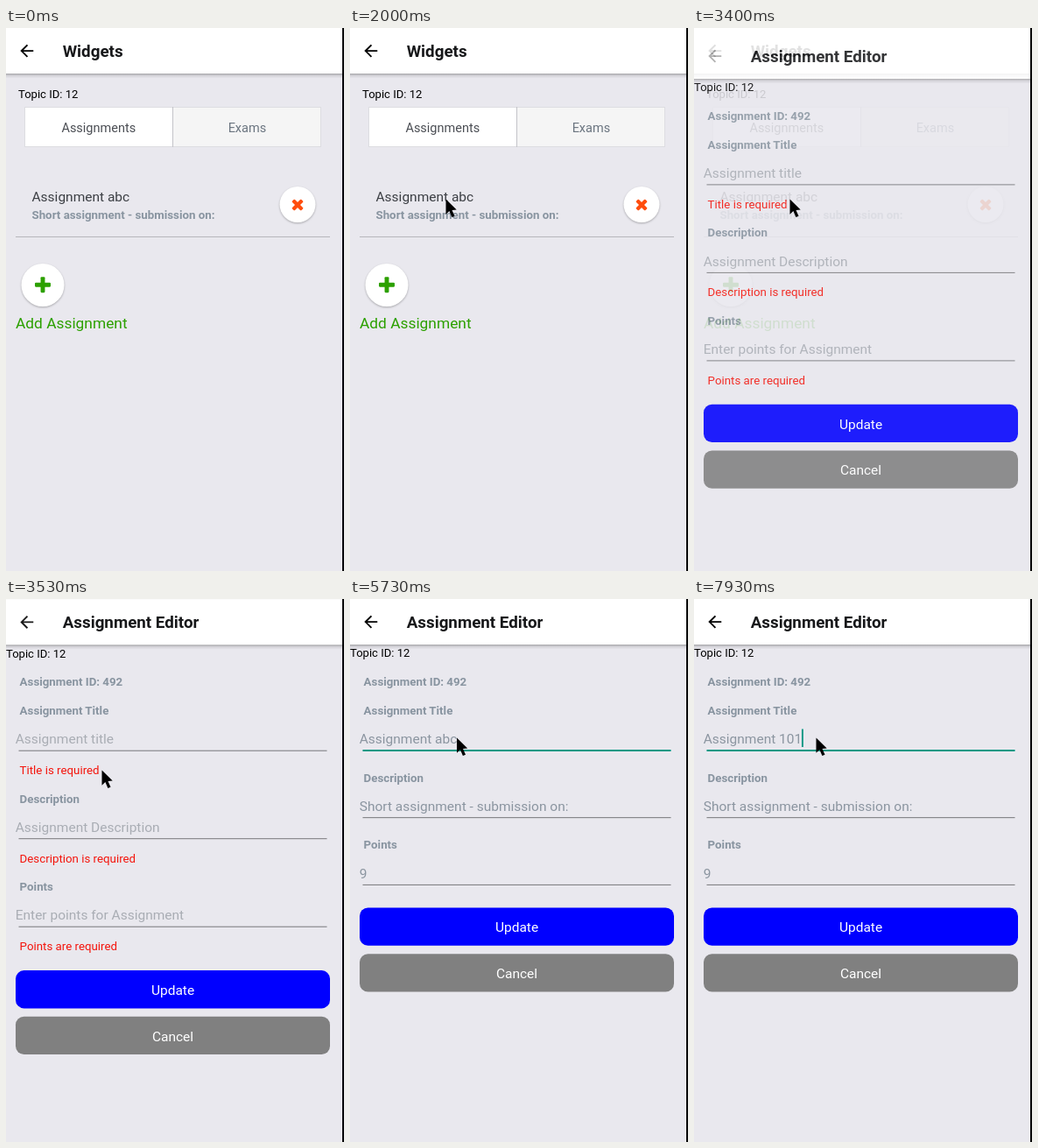
An HTML page for the animation above (8 s loop, 386 by 620 pixels).

```html
<!DOCTYPE html>
<html lang="en">
<head>
<meta charset="utf-8">
<title>Assignment editor</title>
<style>
html, body { margin: 0; width: 100%; height: 100%; overflow: hidden; background: #e9e8ee; }
svg { display: block; width: 386px; height: 620px; }
text { font-family: Roboto, "Noto Sans", sans-serif; white-space: pre; }
.raised { filter: drop-shadow(0 1px 1.3px rgba(0, 0, 0, .28)); }
</style>
</head>
<body>
<svg viewBox="0 0 386 620" xmlns="http://www.w3.org/2000/svg">
  <defs>
    <linearGradient id="shade" x1="0" y1="0" x2="0" y2="1">
      <stop offset="0" stop-color="#000" stop-opacity=".32"/>
      <stop offset=".4" stop-color="#000" stop-opacity=".1"/>
      <stop offset="1" stop-color="#000" stop-opacity="0"/>
    </linearGradient>
  </defs>
  <g id="list"></g>
  <g id="editor"></g>
  <rect x="384" width="2" height="620"/>
  <path id="cursor" d="M0 0V17.2L3.9 13.6 6.9 20.6 10 19.2 7 12.4 12.2 12Z"/>
</svg>
<script>
const LOOP = 8000, TICKS_PER_MS = 0.015;
const BG = '#e9e8ee', MUTED = '#8894a0', TEAL = '#009884';
const FIELD_SIZE = 15.5, FIELD_X = 10.7;
const $ = id => document.getElementById(id);
const measure = document.createElement('canvas').getContext('2d');

// y is the middle of the text line
const text = (s, x, y, size, fill, weight = 400, anchor = 'start') =>
  `<text x="${x}" y="${y + size * 0.342}" font-size="${size}" fill="${fill}" font-weight="${weight}" text-anchor="${anchor}">${s}</text>`;
const rect = (x, y, w, h, fill, extra = '') =>
  `<rect x="${x}" y="${y}" width="${w}" height="${h}" fill="${fill}" ${extra}/>`;
const circle = (x, y, r) => `<circle class="raised" cx="${x}" cy="${y}" r="${r}" fill="#fff"/>`;
const cross = (x, y, arm, width, fill, turn) =>
  `<g transform="translate(${x} ${y}) rotate(${turn})">` +
  rect(-arm, -width / 2, arm * 2, width, fill, 'rx="1.1"') +
  rect(-width / 2, -arm, width, arm * 2, fill, 'rx="1.1"') + '</g>';

function header(title, arrowAlpha = 1) {
  return rect(0, 0, 384, 52.3, '#fff') + rect(0, 52, 384, 5.5, 'url(#shade)') +
    `<path transform="translate(12.6 14.9) scale(.934)" opacity="${arrowAlpha}" d="M20 11H7.83l5.59-5.59L12 4l-8 8 8 8 1.41-1.41L7.83 13H20v-2z"/>` +
    text(title, 64.7, 26.3, 18.8, '#17181a', 700);
}

function listScreen(pressed) {
  return rect(0, 0, 384, 620, BG) + header('Widgets') +
    text('Topic ID: 12', 14, 76, 13.07, '#000') +
    rect(21.5, 90.5, 338, 45, '#f5f5f5', 'stroke="#dddde1"') +
    rect(22, 91, 168, 44, '#fff') + rect(190, 90, 1, 46, '#c3c3c9') +
    text('Assignments', 105.8, 114, 14.5, '#4b4e54', 400, 'middle') +
    text('Exams', 275.4, 114, 14.5, '#6b7580', 400, 'middle') +
    (pressed ? rect(11, 165, 359, 73, '#fff') : '') +
    `<g opacity="${pressed ? 0.82 : 1}">` +
    text('Assignment abc', 29.5, 192.5, FIELD_SIZE, '#3c3f44') +
    text('Short assignment - submission on:', 29.5, 213, 13.3, MUTED, 700) +
    circle(333, 201.5, 20.5) + cross(333, 202, 7.4, 4.3, '#ff4d0d', 45) + '</g>' +
    rect(11, 238, 359, 1, '#b7b7bc') +
    circle(42, 293.5, 24.5) + cross(42, 293.2, 9, 4.9, '#2ca000', 0) +
    text('Add Assignment', 11, 337.5, 17.35, '#2ca000');
}

function field(y, label, value, hint, error, focused, caret) {
  const line = y + 45;
  let out = text(label, 15.6, y, 13.3, MUTED, 700) +
    text(value || hint, FIELD_X, y + 32.3, FIELD_SIZE, value ? '#8b95a0' : '#a9adb4') +
    (focused ? rect(14.5, line - 0.4, 352, 2, TEAL) : rect(14.5, line, 352, 1, '#77777b'));
  if (!value) out += text(error, 15.6, y + 67.8, 13.3, '#f4140c');
  if (caret) {
    measure.font = `${FIELD_SIZE}px Roboto, "Noto Sans", sans-serif`;
    out += rect(FIELD_X - 0.3 + measure.measureText(value).width, 148.5, 1.9, 20.5, TEAL);
  }
  return out;
}

function button(y, label, fill) {
  return rect(11, y, 359, 43.3, fill, 'rx="9.5"') +
    text(label, 190.5, y + 22.6, FIELD_SIZE, '#fff', 400, 'middle');
}

function editorScreen(s) {
  const step = s.filled ? 76.75 : 100.5, top = 127.4, end = top + 3 * step;
  const val = v => s.filled ? v : '';
  return rect(0, 0, 384, 620, BG) + header('Assignment Editor', s.arrow) +
    text('Topic ID: 12', 0, 62, 13.07, '#000') +
    text('Assignment ID: 492', 15.6, 94.2, 13.3, MUTED, 700) +
    field(top, 'Assignment Title', val(s.title), 'Assignment title', 'Title is required', s.focused, s.caret) +
    field(top + step, 'Description', val('Short assignment - submission on:'), 'Assignment Description', 'Description is required') +
    field(top + 2 * step, 'Points', val('9'), 'Enter points for Assignment', 'Points are required') +
    button(end - 5.1, 'Update', '#00f') + button(end + 47.6, 'Cancel', '#808080');
}

// [first tick, last tick, x, y]
const moves = [
  [2, 2, 376, 606],
  [2, 13, 148.5, 212.7],
  [25, 30, 109.5, 195.5],
  [65, 66, 108.3, 194.3],
  [66, 73, 122, 158.5],
  [87, 89, 139.5, 158.5]
];
// tick and title ending
const typing = [[0, 'abc'], [97, 'ab'], [101, 'a'], [107, ''], [113, '1'], [116, '10'], [119, '101']];
// page entrance: offset, opacity, arrow opacity
const entrance = [[29, 0.38, 0.1], [6, 0.87, 0.35], [1.2, 1, 0.7], [0.3, 1, 0.9]];

function cursorAt(k) {
  let [, , x, y] = moves[0];
  for (const [from, to, nx, ny] of moves.slice(1)) {
    if (k <= from) break;
    const p = Math.min(1, (k - from) / (to - from));
    const e = to - from > 8 ? 1 - (1 - p) ** 2 : p * p * (3 - 2 * p);
    x += (nx - x) * e;
    y += (ny - y) * e;
  }
  return [x, y];
}

function draw(k) {
  const [dy, alpha, arrow] = k < 50 ? [0, 0, 0] : entrance[k - 50] || [0, 1, 1];
  const ending = typing.filter(([t]) => t <= k).pop()[1];
  $('list').innerHTML = alpha < 1 || dy ? listScreen(k === 49 || k === 50) : '';
  $('editor').innerHTML = alpha ? editorScreen({
    filled: k >= 54,
    title: 'Assignment ' + ending,
    focused: k >= 79,
    caret: (k >= 79 && k < 86) || k >= 93,
    arrow
  }) : '';
  $('editor').setAttribute('opacity', alpha);
  $('editor').setAttribute('transform', `translate(0 ${dy})`);
  $('cursor').setAttribute('transform', `translate(${cursorAt(k)})`);
  $('cursor').setAttribute('visibility', k < 2 ? 'hidden' : 'visible');
}

let start = null, shown = -1;
function frame(now) {
  if (start === null) start = now;
  const k = Math.floor(((now - start) % LOOP + 5) * TICKS_PER_MS) % 120;
  if (k !== shown) draw(shown = k);
  requestAnimationFrame(frame);
}
draw(0);
requestAnimationFrame(frame);
</script>
</body>
</html>
```
